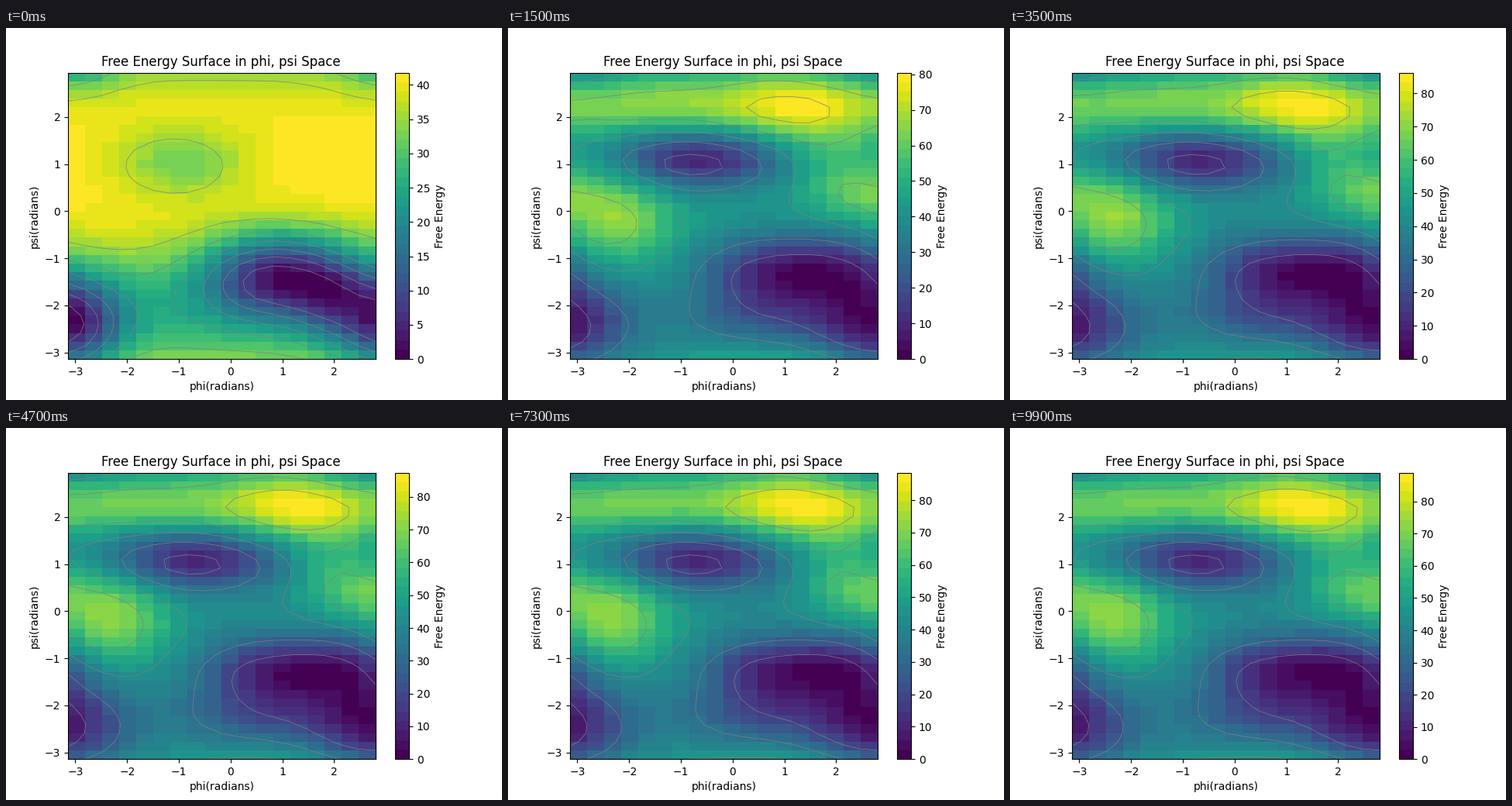
Animation of 640 by 480 pixels, one loop 10 s. Source, as a matplotlib script:

```python
import numpy as np
import matplotlib.pyplot as plt
from matplotlib.animation import FuncAnimation

FRAMES, INTERVAL = 100, 100
FIRST_PEAK, LAST_PEAK = 41.79, 89.9

phi = -np.pi + 0.33 * np.arange(19)
psi = np.linspace(-np.pi, 2.942, 34)
X, Y = np.meshgrid(phi, psi)


def wrap(a):
    return (a + np.pi) % (2 * np.pi) - np.pi


def hill(x, y, sx, sy, height):
    """Periodic Gaussian on the torsion grid."""
    return height * np.exp(-(wrap(X - x) / sx) ** 2 / 2
                           - (wrap(Y - y) / sy) ** 2 / 2)


EVERYWHERE = 1e3  # width of a hill that is flat along one axis

# Few hills deposited: a plateau with shallow basins
early = (
    FIRST_PEAK
    - hill(0.0, -2.2, EVERYWHERE, 0.95, 15)
    - hill(0.8, -1.4, 1.0, 0.63, 29)
    - hill(3.05, -2.5, 0.68, 0.7, 25)
    - hill(1.9, -2.0, 0.55, 0.6, 11)
    - hill(-1.09, 0.96, 0.95, 0.55, 9.5)
)

# Converged surface: barriers above and basins below a mean level
late = (
    42
    + hill(0.0, 2.2, EVERYWHERE, 0.45, 20)
    + hill(1.1, 2.15, 1.0, 0.6, 26)
    + hill(-2.0, 2.2, 0.9, 0.45, 6)
    + hill(1.8, 1.0, 0.6, 0.6, 12)
    + hill(2.5, 0.3, 0.7, 0.4, 18)
    + hill(-2.45, -0.25, 0.75, 0.65, 30)
    - hill(-0.75, 1.03, 1.2, 0.45, 35)
    - hill(0.6, -1.35, 0.9, 0.5, 31)
    - hill(2.1, -1.3, 0.8, 0.5, 27)
    - hill(2.7, -2.5, 0.95, 0.62, 39)
    - hill(0.4, -2.3, 1.1, 0.45, 18)
)

# Transient: the upper basin and ridge form ahead of the rest
ahead = hill(-1.0, 2.2, 1.0, 0.4, 6) - hill(-0.75, 1.0, 0.9, 0.35, 8)


def surface(n):
    left = (1 + n / 7.66) ** -1.5
    peak = LAST_PEAK - (LAST_PEAK - FIRST_PEAK) * left
    z = late + left * (early - late) + 4 * left * (1 - left) * ahead
    z -= z.min()
    return z * peak / z.max(), peak


fig, ax = plt.subplots(figsize=(6.4, 4.8), dpi=100)
z0, peak0 = surface(0)
mesh = ax.pcolormesh(phi, psi, z0[:-1, :-1], shading="flat",
                     cmap=plt.get_cmap("viridis", 30), vmin=0, vmax=peak0)
ax.set_title("Free Energy Surface in phi, psi Space", x=0.498)
ax.set(xlabel="phi(radians)", ylabel="psi(radians)",
       xlim=(phi[0], phi[-1]), ylim=(psi[0], psi[-1]))
bar = fig.colorbar(mesh, ax=ax)
bar.set_label("Free Energy")
lines = []


def update(n):
    while lines:
        lines.pop().remove()
    z, peak = surface(n)
    mesh.set_array(z[:-1, :-1])
    mesh.set_clim(0, peak)
    lines.append(ax.contour(phi, psi, z, colors="gray", linewidths=0.5))
    return [mesh]


anim = FuncAnimation(fig, update, frames=FRAMES, interval=INTERVAL,
                     repeat=True, repeat_delay=0, blit=False)
plt.show()
```
